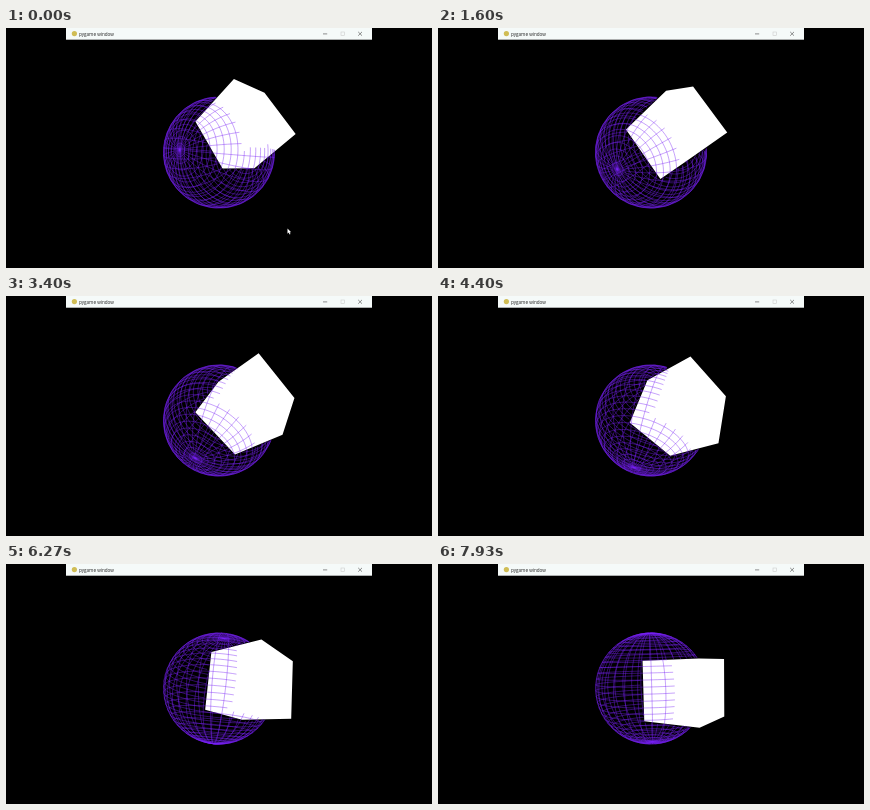
Animation of 426 by 240 pixels, one loop 8000 ms. Source, as an HTML page:

```html
<!DOCTYPE html>
<html>
<head>
<meta charset="utf-8">
<style>
html, body { margin: 0; width: 100%; height: 100%; overflow: hidden; background: #000; }
svg { display: block; width: 100%; height: 100%; }
</style>
</head>
<body>
<svg viewBox="0 0 426 240">
  <rect width="426" height="240"/>
  <path id="cube" fill="#fff"/>
  <path id="wire" fill="none" stroke="#7a22f6" stroke-width="0.42"/>
  <rect x="60" width="306" height="11.7" fill="#f5faf9"/>
  <circle cx="68.4" cy="5.6" r="2.6" fill="#d0bd55"/>
  <text x="73" y="7.6" font-family="'Open Sans', sans-serif" font-size="4.6" fill="#222">pygame window</text>
  <g fill="none" stroke="#444" stroke-width="0.6">
    <path d="M317 5.9h4.2M352.2 3.9l3.8 3.8m0 -3.8l-3.8 3.8"/>
    <rect x="335" y="4" width="3.6" height="3.6" stroke="#ccc"/>
  </g>
  <path id="cursor" d="M0 0v5.2l1.2-1.1 .9 1.9 .9-.4-.9-1.8h1.6z" fill="#fff"/>
</svg>
<script>
const LOOP = 8000, FPS = 15;
const CX = 213, CY = 124.5, FOCAL = 272, DIST = 5;
const SLICES = 30, STACKS = 30;
const LO = [0.2, -0.5, -0.5], HI = [1.2, 0.5, 0.5];
const AXIS = [3, 1, 1].map(v => v / Math.sqrt(11));
// time in ms, turn in degrees
const TURN = [[0, 166], [930, 175.8], [2200, 193], [3400, 208], [5400, 236], [7000, 258.7], [8000, 270.2]];
const $ = id => document.getElementById(id);

function turnAt(t) {
  const i = Math.max(1, TURN.findIndex(k => k[0] >= t));
  const [t0, a0] = TURN[i - 1], [t1, a1] = TURN[i];
  return a0 + (a1 - a0) * (t - t0) / (t1 - t0);
}

function rotation(deg) {
  const r = deg * Math.PI / 180, c = Math.cos(r), s = Math.sin(r), k = 1 - c;
  const [x, y, z] = AXIS;
  return [
    [c + k * x * x, k * x * y - s * z, k * x * z + s * y],
    [k * x * y + s * z, c + k * y * y, k * y * z - s * x],
    [k * x * z - s * y, k * y * z + s * x, c + k * z * z]
  ];
}

function project(m, p) {
  const [x, y, z] = m.map(r => r[0] * p[0] + r[1] * p[1] + r[2] * p[2]);
  const s = FOCAL / (DIST - z);
  return (CX + x * s).toFixed(2) + ' ' + (CY - y * s).toFixed(2);
}

// Does the box block the sight line from p to the eye?
function hidden(p, eye) {
  let near = 0, far = 1;
  for (let k = 0; k < 3; k++) {
    const d = eye[k] - p[k] || 1e-9;
    const a = (LO[k] - p[k]) / d, b = (HI[k] - p[k]) / d;
    near = Math.max(near, Math.min(a, b));
    far = Math.min(far, Math.max(a, b));
  }
  return near < far;
}

const onSphere = (lat, lon) =>
  [Math.sin(lat) * Math.sin(lon), Math.sin(lat) * Math.cos(lon), Math.cos(lat)];

const curves = [];
function addCurve(steps, at) {
  curves.push(Array.from({ length: steps + 1 }, (_, i) => at(i / steps)));
}
for (let i = 0; i < SLICES; i++)
  addCurve(72, u => onSphere(u * Math.PI, i * 2 * Math.PI / SLICES));
for (let i = 1; i < STACKS; i++)
  addCurve(96, u => onSphere(i * Math.PI / STACKS, u * 2 * Math.PI));

function wirePath(m, eye) {
  let d = '';
  for (const curve of curves) {
    let pen = 'M';
    for (const p of curve) {
      if (hidden(p, eye)) { pen = 'M'; continue; }
      d += pen + project(m, p);
      pen = 'L';
    }
  }
  return d;
}

function cubePath(m, eye) {
  let d = '';
  for (let k = 0; k < 3; k++) {
    const side = eye[k] > HI[k] ? HI : eye[k] < LO[k] ? LO : null;
    if (!side) continue;
    const u = (k + 1) % 3, v = (k + 2) % 3;
    const corners = [[LO, LO], [HI, LO], [HI, HI], [LO, HI]].map(([a, b]) => {
      const p = [];
      p[k] = side[k]; p[u] = a[u]; p[v] = b[v];
      return project(m, p);
    });
    d += 'M' + corners.join('L') + 'Z';
  }
  return d;
}

function draw(t) {
  const m = rotation(turnAt(t));
  const eye = m[2].map(v => v * DIST);
  $('cube').setAttribute('d', cubePath(m, eye));
  $('wire').setAttribute('d', wirePath(m, eye));
  $('cursor').setAttribute('transform', `translate(281.5 ${200.5 + 22 * t / 870})`);
  $('cursor').style.display = t < 900 ? '' : 'none';
}

let last = -1;
function tick() {
  // the small lead absorbs timestamps rounded down to 10 ms
  const step = Math.floor((performance.now() + 6) % LOOP * FPS / 1000);
  if (step !== last) draw(step * 1000 / FPS);
  last = step;
  requestAnimationFrame(tick);
}
tick();
</script>
</body>
</html>
```
